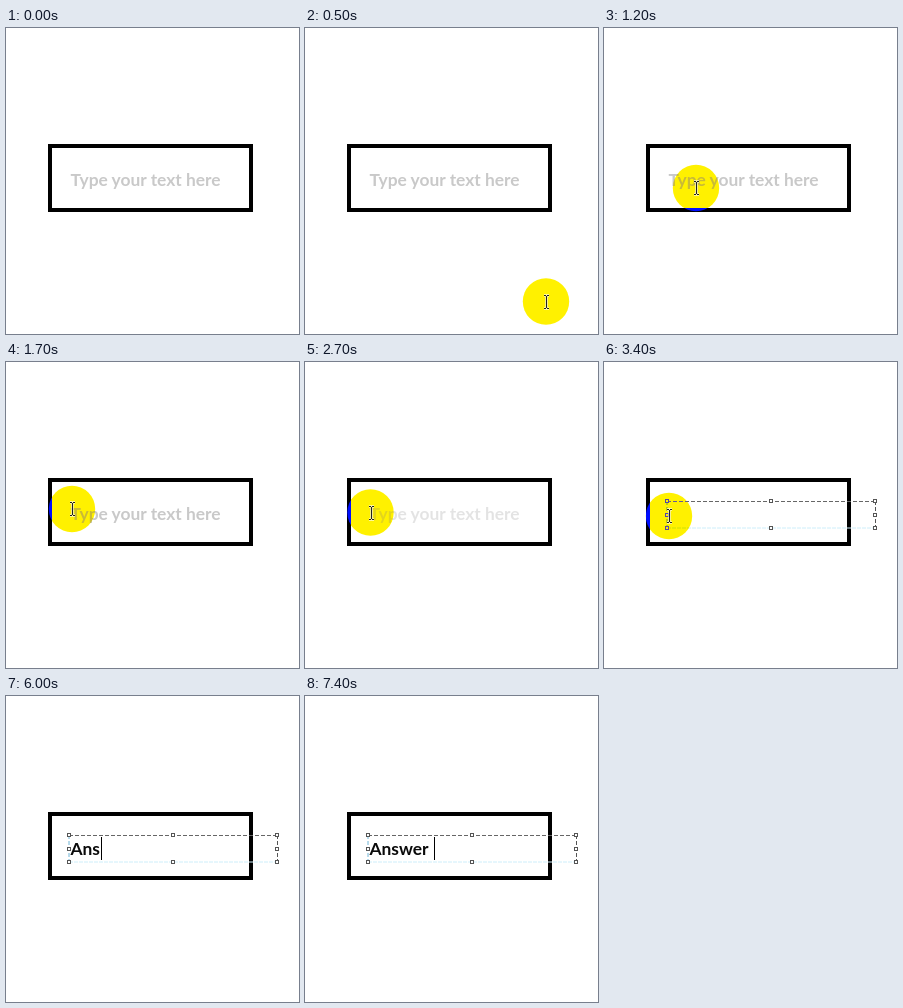
Animation of 293 by 306 pixels, one loop 7.9 s. Source, as an HTML page:

```html
<!DOCTYPE html>
<html lang="en">
<head>
<meta charset="utf-8">
<title>Typing into a text box</title>
<style>
  html, body { margin: 0; width: 100%; height: 100%; overflow: hidden; background: #fff; }
  svg { display: block; width: 293px; height: 306px; isolation: isolate; }
  text { font: bold 17.4px Lato, Carlito, "Open Sans", sans-serif; white-space: pre; }
  #spot { fill: rgb(0, 14, 255); mix-blend-mode: difference; }
  #handles rect { fill: #fff; stroke: #555; }
</style>
</head>
<body>
<svg viewBox="0 0 293 306">
  <rect width="293" height="306" fill="#fff"/>
  <rect x="44" y="118" width="201" height="64" fill="none" stroke="#000" stroke-width="4"/>
  <text id="hint" x="64.5" y="158" fill="#c9c9c9">Type your text here</text>

  <g id="field">
    <path d="M63 139.5H271" stroke="#fff"/>
    <path d="M63 139.5H271" stroke="#666" stroke-dasharray="4 2"/>
    <path d="M63 166H271" stroke="#cdeefa" stroke-dasharray="4 1"/>
    <path d="M63 139V166" stroke="#6fb4d6" stroke-dasharray="4 2"/>
    <path d="M271.5 139V166" stroke="#555" stroke-dasharray="4 2"/>
    <g id="handles"></g>
  </g>

  <text id="typed" x="64.5" y="159" fill="#0a0a0a"></text>
  <rect id="caret" y="141" width="1" height="23" fill="#000"/>

  <g id="pointer">
    <circle id="spot" r="23.2"/>
    <g id="beam" fill="none">
      <path d="M0 -6V6M-2.5 -6.5H2.5M-2.5 6.5H2.5" stroke="#fff" stroke-opacity=".6" stroke-width="3"/>
      <path d="M0 -6V6M-2.5 -6.5H-.5M.5 -6.5H2.5M-2.5 6.5H-.5M.5 6.5H2.5" stroke="#222" stroke-width="1.1"/>
    </g>
  </g>
</svg>
<script>
const LOOP = 7900, STEP = 100;
const FIELD_ON = 3300, FADE = [2300, 3100];

// time, x, y of the pointer
const path = [
  [400, 267, 291], [600, 215, 256], [800, 161.5, 213], [1100, 109, 175],
  [1200, 92, 160], [1300, 80, 152], [1500, 65, 144], [1700, 66, 147],
  [2300, 66, 147], [3100, 65, 154], [3400, 65, 154], [3500, 95, 165],
  [3600, 165, 200], [3700, 255, 250]
];

// time, text, caret x (0 = hidden)
const typing = [
  [0, "", 0], [4600, "A", 76], [5100, "A", 0], [5500, "An", 0],
  [5800, "An", 87], [5900, "Ans", 95], [6100, "Answ", 109],
  [6300, "Answe", 118], [6500, "Answer", 0], [7000, "Answer ", 129]
];

const el = id => document.getElementById(id);
const show = (node, on) => node.setAttribute("visibility", on ? "visible" : "hidden");
const place = (node, x, y) => node.setAttribute("transform", `translate(${x} ${y})`);
const [hint, field, typed, caret, pointer, spot, beam] =
  ["hint", "field", "typed", "caret", "pointer", "spot", "beam"].map(el);

for (const x of [63, 167, 271])
  for (const y of [139, 153, 166])
    if (x !== 167 || y !== 153)
      el("handles").insertAdjacentHTML("beforeend",
        `<rect x="${x - 1.5}" y="${y - 1.5}" width="3" height="3"/>`);

function pointAt(t) {
  const i = path.findIndex(p => p[0] >= t);
  if (t < path[0][0] || i < 0) return null;
  const b = path[i], a = path[Math.max(i - 1, 0)];
  const k = b === a ? 0 : (t - a[0]) / (b[0] - a[0]);
  return [a[1] + (b[1] - a[1]) * k, a[2] + (b[2] - a[2]) * k];
}

function draw(t) {
  const fade = (t - FADE[0]) / (FADE[1] - FADE[0]);
  hint.setAttribute("opacity", Math.min(1, Math.max(0, 1 - fade)));
  show(field, t >= FIELD_ON);

  const [, text, x] = typing.filter(s => s[0] <= t).pop();
  if (typed.textContent !== text) typed.textContent = text;
  caret.setAttribute("x", x);
  show(caret, x > 0);

  const p = pointAt(t);
  show(pointer, p);
  if (p) {
    place(spot, ...p);
    place(beam, Math.round(p[0]) + .5, Math.round(p[1]));
  }
}

const start = performance.now();
function tick() {
  const t = (performance.now() - start) % LOOP;
  draw(Math.floor(t / STEP) * STEP);
  requestAnimationFrame(tick);
}
tick();
</script>
</body>
</html>
```
